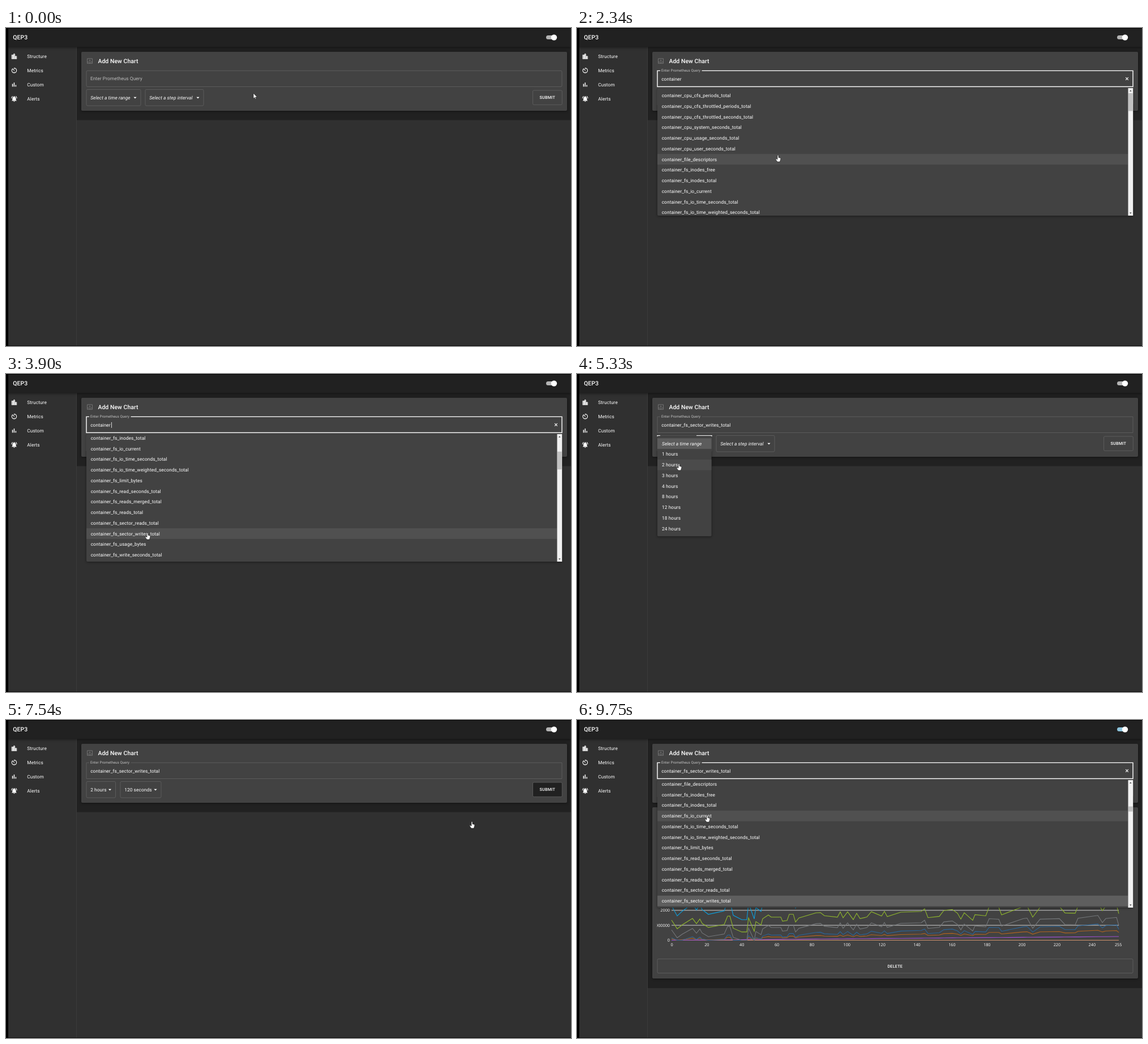
These frames come from a looping animation (998 px wide and 561 px high, 9880 ms). An HTML page:

```html
<!DOCTYPE html>
<html lang="en">
<head>
<meta charset="utf-8">
<title>Add New Chart</title>
<style>
html, body { margin: 0; width: 100%; height: 100%; overflow: hidden; background: #303030; }
svg { display: block; width: 998px; height: 561px; }
text { font: 8.33px Roboto, sans-serif; letter-spacing: .078px; fill: #fff; text-rendering: geometricPrecision; }
.h { font-size: 10.42px; font-weight: 500; }
.i { font-style: italic; }
.hint { fill: #bdbdbd; }
.small { font-size: 6.25px; letter-spacing: .06px; fill: #c4c4c4; }
.btn { font-size: 7.29px; font-weight: 500; letter-spacing: .208px; text-anchor: middle; }
.tick, .title { font: 7.29px "Open Sans", sans-serif; letter-spacing: 0; text-anchor: middle; }
.title { font-size: 11.1px; font-weight: 700; }
.end { text-anchor: end; }
.up { filter: drop-shadow(0 1px 2px rgba(0,0,0,.45)); }
</style>
</head>
<body>
<svg id="stage" viewBox="0 0 998 561"></svg>
<script>
const LOOP = 9880, STEP = 130, ROW = 18.75;
const CHOICE = 'container_fs_sector_writes_total';

const text = (x, y, s, c = '') => `<text x="${x}" y="${y}" class="${c}">${s}</text>`;
const rect = (x, y, w, h, fill, more = '') =>
  `<rect x="${x}" y="${y}" width="${w}" height="${h}" fill="${fill}" ${more}/>`;
const path = (d, fill, more = '') => `<path d="${d}" fill="${fill}" ${more}/>`;
const line = (d, stroke, w = 1) => path(d, 'none', `stroke="${stroke}" stroke-width="${w}"`);
const box = (x, y, w, h, fill = 'none') => rect(x, y, w, h, fill, 'rx="2" stroke="#626262" stroke-width=".8"');
const card = (y, h) => rect(133, y, 858, h, '#424242', 'rx="2" class="up"');

// Metric names
const metrics = ('aggregator_openapi_v2_regeneration_count aggregator_openapi_v2_regeneration_duration ' +
  'aggregator_unavailable_apiservice apiserver_admission_controller_admission_duration_seconds_bucket ' +
  'apiserver_admission_controller_admission_duration_seconds_count ' +
  'apiserver_admission_controller_admission_duration_seconds_sum apiserver_audit_event_total ' +
  'apiserver_audit_requests_rejected_total apiserver_client_certificate_expiration_seconds_bucket ' +
  'apiserver_client_certificate_expiration_seconds_count apiserver_current_inflight_requests ' +
  'apiserver_longrunning_gauge apiserver_registered_watchers').split(' ');
const containers = ('cpu_cfs_periods_total cpu_cfs_throttled_periods_total cpu_cfs_throttled_seconds_total ' +
  'cpu_system_seconds_total cpu_usage_seconds_total cpu_user_seconds_total file_descriptors fs_inodes_free ' +
  'fs_inodes_total fs_io_current fs_io_time_seconds_total fs_io_time_weighted_seconds_total fs_limit_bytes ' +
  'fs_read_seconds_total fs_reads_merged_total fs_reads_total fs_sector_reads_total fs_sector_writes_total ' +
  'fs_usage_bytes fs_write_seconds_total fs_writes_merged_total fs_writes_total last_seen memory_cache')
  .split(' ').map(s => 'container_' + s);
const allMetrics = metrics.concat(containers);

const ranges = ['Select a time range', ...[1, 2, 3, 4, 8, 12, 18, 24].map(n => n + ' hours')];
const intervals = ['Select a step interval', ...[30, 60, 90, 120].map(n => n + ' seconds')];

// Pointer keys: time, x, y
const route = [[0, 437, 115], [130, 340, 88], [2080, 340, 88], [2340, 355, 224], [3120, 330, 236],
  [3640, 250, 280], [4420, 250, 280], [5070, 185, 118], [5330, 180, 158], [5590, 180, 158],
  [6110, 262, 118], [6370, 262, 118], [6630, 238, 195], [6760, 238, 195], [7280, 952, 118],
  [7410, 952, 118], [7540, 823, 179], [7670, 823, 179], [8580, 274, 107], [8710, 262, 88],
  [8970, 262, 88], [9750, 230, 168]];

function pointerAt(t) {
  const n = route.findIndex(k => k[0] > t);
  if (n < 0) return route[route.length - 1].slice(1);
  const [a, b] = [route[n - 1], route[n]], k = (t - a[0]) / (b[0] - a[0]);
  return [a[1] + (b[1] - a[1]) * k, a[2] + (b[2] - a[2]) * k];
}

// Fixed page parts
const icons = [
  'M15 11V5l-3-3-3 3v2H3v14h18V11h-6zm-8 8H5v-2h2v2zm0-4H5v-2h2v2zm0-4H5V9h2v2zm6 8h-2v-2h2v2zm0-4h-2v-2h2v2zm0-4h-2V9h2v2zm0-4h-2V5h2v2zm6 12h-2v-2h2v2zm0-4h-2v-2h2v2z',
  'M11 17c0 .55.45 1 1 1s1-.45 1-1-.45-1-1-1-1 .45-1 1zm0-14v4h2V5.08c3.39.49 6 3.39 6 6.92 0 3.87-3.13 7-7 7s-7-3.13-7-7c0-1.68.59-3.22 1.58-4.42L12 13l1.41-1.41-6.8-6.8v.02C4.42 6.45 3 9.05 3 12c0 4.97 4.02 9 9 9 4.97 0 9-4.03 9-9s-4.03-9-9-9h-1z',
  'M5 9.2h3V19H5zM10.6 5h2.8v14h-2.8zm5.6 8H19v6h-2.8z',
  'M7.58 4.08L6.15 2.65C3.75 4.48 2.17 7.3 2.03 10.5h2c.15-2.65 1.51-4.97 3.55-6.42zm12.39 6.42h2c-.15-3.2-1.73-6.02-4.12-7.85l-1.42 1.43c2.02 1.45 3.39 3.77 3.54 6.42zM18 11c0-3.07-1.64-5.64-4.5-6.32V4c0-.83-.67-1.5-1.5-1.5s-1.5.67-1.5 1.5v.68C7.63 5.36 6 7.92 6 11v5l-2 2v1h16v-1l-2-2v-5zm-6 11c1.1 0 2-.9 2-2h-4c0 1.1.9 2 2 2z'];
const sidebar = ['Structure', 'Metrics', 'Custom', 'Alerts'].map((s, i) =>
  path(icons[i], '#fff', `transform="translate(8.2 ${43.7 + 25 * i}) scale(.521)"`) +
  text(37.3, 52.6 + 25 * i, s)).join('');
const page = rect(0, 0, 998, 561, '#303030') + line('M124.5 33V561', '#3b3b3b');
const frame = rect(0, 0, 998, 33.5, '#212121', 'class="up"') + text(12.3, 20.3, 'QEP3', 'h') + sidebar;
const edges = rect(0, 0, 4, 561, '#000') + rect(0, 0, 998, 1, '#000') + rect(0, 560.3, 998, 1, '#000');
const heading = card(42, 104) + text(162.4, 61.9, 'Add New Chart', 'h') +
  line('M143.5 54h9v8.5h-9zM143.5 60h2.5l1 1h2l1-1h2.5M148 55.5v3M146.5 57.2l1.5 1.5 1.5-1.5', '#777', .9);

// Chart: one shared shape, scaled for each series
const shape = [167,264, 177,292, 186,279, 204,259, 211,276, 217,261, 221,275, 232,288, 260,279, 266,252,
  270,252, 276,291, 291,303, 300,303, 303,258, 313,301, 316,270, 325,281, 328,261, 338,249, 343,256,
  360,256, 363,269, 371,267, 375,247, 382,247, 386,272, 392,259, 422,243, 430,242, 437,252, 460,257,
  465,240, 470,259, 478,240, 488,265, 494,245, 500,262, 512,257, 520,240, 538,254, 543,239, 548,256,
  572,242, 608,240, 614,231, 620,260, 640,256, 648,237, 663,234, 672,246, 678,265, 684,245, 699,269,
  703,251, 722,255, 728,226, 745,228, 750,252, 788,226, 795,224, 805,260, 818,228, 852,226, 862,247,
  880,248, 885,225, 920,215, 928,240, 934,226, 953,222, 957,250];
const BASE = 388.5;
// colour, height at left, height at right, swing
const series = [['#9d4fd0', 0, 6.5, 0], ['#b0621e', 2, 17, .12], ['#2a6599', 3, 27, .28],
  ['#74777a', 16, 40, .5], ['#8fb62c', 33, 62, .55], ['#0ba0df', 58, 92, .65],
  ['#c9184f', 86, 127, .75], ['#aee01e', 120, 166, 1]];

function curve([color, left, right, swing]) {
  let d = '';
  for (let i = 0; i < shape.length; i += 2) {
    const x = shape[i], k = (x - 167) / 790;
    const off = BASE - shape[i + 1] - (120 + 46 * k);
    const v = Math.max(0, left + (right - left) * k + swing * off);
    d += (i ? 'L' : 'M') + x + ' ' + (BASE - v).toFixed(1);
  }
  return line(d, color, swing === 1 ? 1.5 : 1.1);
}

function buildChart() {
  let s = card(154, 302) + text(562, 186.8, CHOICE, 'title');
  for (let i = 0; i < 8; i++) {
    const y = BASE - 26.36 * i;
    s += line(`M167 ${y}H957`, i === 7 ? '#6c6570' : i ? '#cfcfcf' : '#d0936c');
    s += `<g clip-path="url(#plot)">${text(164, y + 2.6, i === 1 ? '900000' : i * 1000, 'tick end')}</g>`;
  }
  for (let n = 0; n <= 240; n += 20) s += text(167.5 + n * 3.093, 398.7, n, 'tick');
  s += text(956.2, 398.7, 255, 'tick') + series.map(curve).join('');
  return s + box(142, 421.5, 840, 25) + text(561.8, 436.6, 'DELETE', 'btn');
}
const chart = buildChart();

const defs = '<defs><clipPath id="list"><rect x="142" y="106" width="831.5" height="225"/></clipPath>' +
  '<clipPath id="plot"><rect x="141.3" y="190" width="850" height="220"/></clipPath></defs>';

function select(x, w, label, italic) {
  return box(x, 108.5, w, 28.6) + text(x + 7.2, 126.1, label, italic ? 'i' : '') +
    path(`M${x + w - 12.6} 121.8h5.2l-2.6 2.6z`, '#fff');
}

function menu(x, w, items, y) {
  const hover = Math.floor((y - 113.4) / ROW);
  return line(`M${x} 110v-1.3h5M${x + w - 27} 108.7h27v1.3`, '#fff', 1.2) +
    rect(x, 109.5, w - .5, items.length * ROW + 8, '#424242', 'rx="2" class="up"') +
    items.map((s, i) => (i === 0 || i === hover
      ? rect(x, 113.4 + ROW * i, w - .5, ROW, i ? '#4b4b4b' : '#5c5c5c') : '') +
      text(x + 8, 125.7 + ROW * i, s, i ? '' : 'i')).join('');
}

function options(items, scroll, y, thumbY, thumbH) {
  const hover = Math.floor((y - 109.7 + scroll) / ROW);
  let s = rect(142, 106, 840, 225, '#424242', 'rx="2" class="up"') + '<g clip-path="url(#list)">';
  items.forEach((name, i) => {
    const top = 109.7 + ROW * i - scroll;
    if (top < 85 || top > 331) return;
    const picked = name === CHOICE && thumbY > 150;
    if (picked || (i === hover && y > 106)) s += rect(142, top, 832, ROW, picked ? '#5e5e5e' : '#505050');
    s += text(149.7, top + 12.3, name);
  });
  return s + '</g>' + rect(973.5, 106, 8.7, 225, '#f1f1f1') + rect(974, thumbY, 7.6, thumbH, '#c1c1c1') +
    path('M976 111.8h3.6l-1.8-2.2zM976 325.6h3.6l-1.8 2.2z', '#444');
}

function pointer(x, y, kind) {
  const d = {
    arrow: 'M0 0V9.5L2.2 7.5 3.7 10.7 5 10.1 3.6 7H6.6Z',
    hand: 'M-1 .8Q0-.6 1 .8V4.4L4 5.2Q5 5.6 4.9 6.8L4.2 9.4 3.4 12H-1.2L-3.8 8.2Q-4.4 6.6-3 6.6L-1 8Z',
    text: 'M-2 0H2M0 0V9M-2 9H2'
  }[kind];
  const move = `transform="translate(${x.toFixed(1)} ${y.toFixed(1)})"`;
  return kind === 'text' ? path(d, 'none', move + ' stroke="#ddd" stroke-width=".8"')
    : path(d, '#fff', move + ' stroke="#111" stroke-width=".6"');
}

function scene(t) {
  const [x, y] = pointerAt(t);
  const between = (a, b) => t >= a && t < b;
  const early = between(390, 4420), late = t >= 8840, open = early || late;
  const rangeOpen = between(5200, 5720), stepOpen = between(6240, 6890);
  const charted = t >= 7930;
  const typed = Math.max(0, Math.min(9, Math.floor((t - 520) / STEP)));
  const query = t >= 4420 ? CHOICE : 'container'.slice(0, typed);

  let s = defs + page + rect(125, 33, 873, charted ? 440 : 129.5, '#212121') + frame;
  s += rect(954, 13, 18, 7, charted ? '#8cc4dc' : '#b4b4b4', 'rx="3.5"') +
    '<circle cx="968" cy="16.6" r="5.2" fill="#fff"/>' + heading;
  if (charted) s += chart;

  // Query field
  const raised = open || query;
  if (raised) {
    s += line('M147 75.4H142V103.5H982V75.4H220.5', open ? '#fff' : '#626262', open ? 1.4 : .8) +
      text(149, 77.2, 'Enter Prometheus Query', 'small');
  } else {
    s += box(142, 75.4, 840, 28.1) + text(149, 92.2, 'Enter Prometheus Query', 'hint');
  }
  s += `<text x="149.2" y="92.8">${query}</text>`;
  const lit = t < 2340 || Math.floor((t - 3900) / 520) % 2 === 0;
  if (early && lit) s += rect(149.5 + typed * 4.05, 85, .8, 10, '#fff');
  if ((early && query) || t >= 8450) s += line('M969.2 87.2l4.6 4.6M973.8 87.2l-4.6 4.6', '#fff', 1.1);

  // Selects and button
  const hasRange = t >= 5720, hasStep = t >= 6890, stepX = hasRange ? 202 : 246;
  s += hasRange ? select(142, 51.5, '2 hours') : select(142, 96, ranges[0], true);
  s += hasStep ? select(stepX, 72, '120 seconds') : select(stepX, 103, intervals[0], true);
  s += box(930.5, 110, 51.8, 25.4, between(7280, 7930) ? '#212121' : 'none') +
    text(956.3, 125.3, 'SUBMIT', 'btn');

  if (rangeOpen) s += menu(142, 96, ranges, y);
  if (stepOpen) s += menu(stepX, 103, intervals, y);
  if (early) {
    const notch = Math.max(0, Math.min(3, Math.floor((t - 2470) / 180)));
    const scroll = 52.08 * notch;
    s += options(allMetrics.filter(m => m.includes(query)), scroll, y,
      115 + scroll * .14, typed < 5 ? 9 : 31.5);
  }
  if (late) s += options(containers, 118.6, y, 152.5, 9);

  const inField = y > 75 && y < 100 && x > 142 && x < 982;
  const onControl = y > 108 && y < 137 && (x < 350 || x > 930);
  const overList = open && y > 106;
  const kind = inField ? 'text'
    : onControl || overList || rangeOpen || stepOpen || between(7280, 7800) ? 'hand' : 'arrow';
  return s + pointer(x, y, kind) + edges;
}

const stage = document.getElementById('stage');
let shown = -1;
function tick() {
  const step = Math.floor(performance.now() % LOOP / STEP);
  if (step !== shown) stage.innerHTML = scene((shown = step) * STEP);
  requestAnimationFrame(tick);
}
tick();
</script>
</body>
</html>
```
